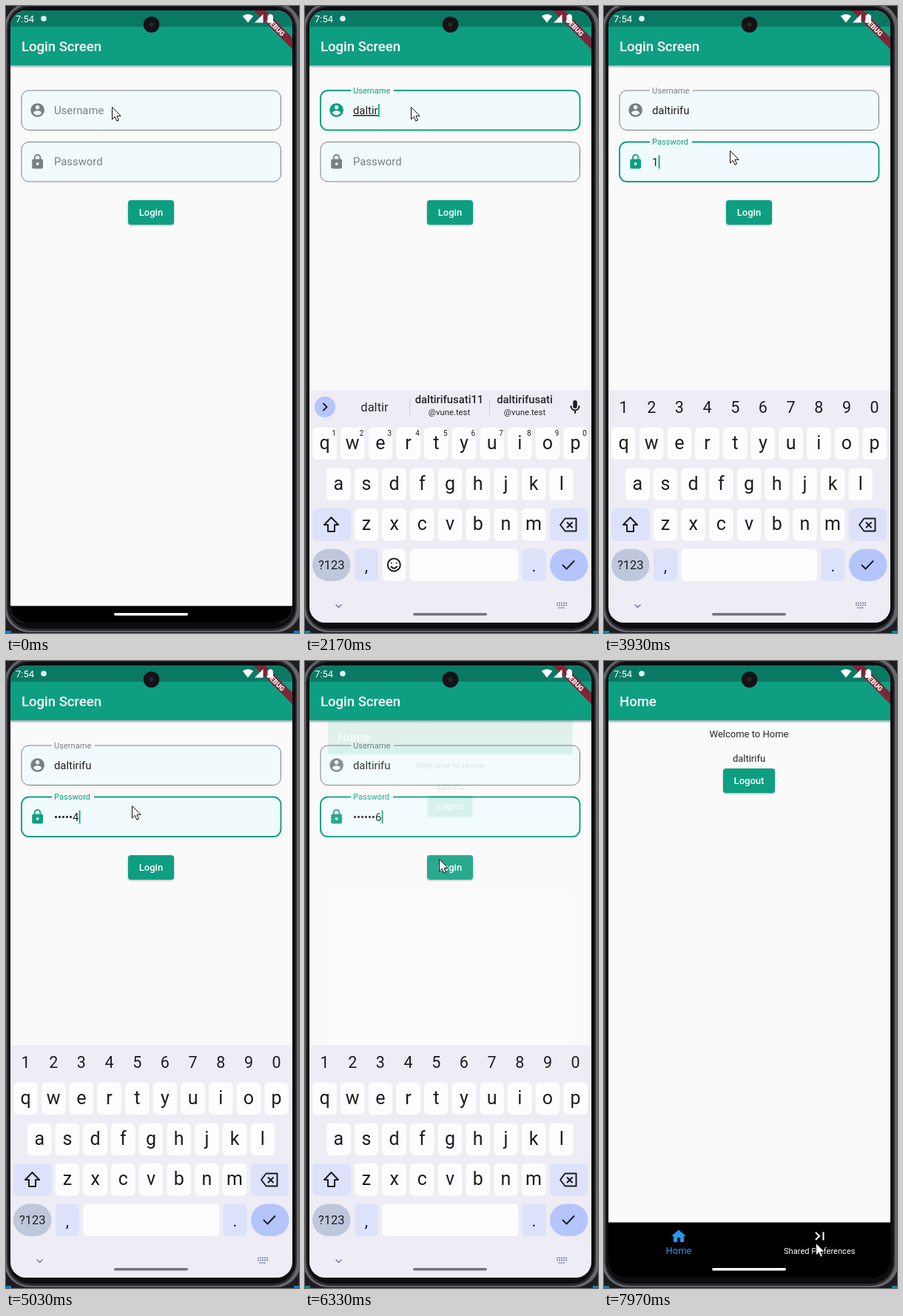
Write an HTML page that moves like this. It is 396 px wide and 846 px high and loops after 8 s.

```html
<!DOCTYPE html>
<html lang="en">
<head>
<meta charset="utf-8">
<title>Login flow</title>
<style>
:root { --teal: #0e9f82; --idle: #788083; --page: #fafafb; --ink: #1d1d21; }
html, body { margin: 0; width: 100%; height: 100%; overflow: hidden; background: #1b1d21; }
svg { display: block; width: 396px; height: 846px; font-family: Roboto, sans-serif; }
.mid { text-anchor: middle; }
.title { font-size: 18.5px; font-weight: 500; fill: #fff; }
.input { font-size: 14.83px; fill: #202022; stroke: none; }
.body { font-size: 13px; fill: #27272a; }
.btn rect { fill: var(--teal); filter: drop-shadow(0 1.5px 1px #0005); }
.btn text { font-size: 13px; font-weight: 500; fill: #fff; text-anchor: middle; }
.field { color: var(--idle); stroke-width: 1px; }
.box { fill: #f1fbfd; stroke: none; }
.border { fill: none; stroke: currentColor; }
.icon { fill: currentColor; stroke: none; }
.line { fill: none; stroke: var(--ink); stroke-width: 2; stroke-linecap: round; stroke-linejoin: round; }
.label { font-size: 14.83px; fill: currentColor; stroke: none; }
.key { fill: #fdfdff; }
.mod { fill: #dce2f9; }
.pill { fill: #bfc7dc; }
.accent { fill: #b4c5fc; }
.glyph { font-size: 25px; fill: var(--ink); text-anchor: middle; }

.field, .label, .gap, #keyboard, .words, .digits, #handle, #home, #pointer {
  animation: 8s linear infinite;
}
#user { animation-name: user-focus; }
#pass { animation-name: pass-focus; }
#user .label { animation-name: user-float; }
#pass .label { animation-name: pass-float; }
.label { animation-timing-function: cubic-bezier(.4, 0, .2, 1); }
#user .gap { animation-name: user-gap; }
#pass .gap { animation-name: pass-gap; }
#keyboard { animation-name: keyboard; }
.words { animation-name: words; }
.digits { animation-name: digits; }
#handle { animation-name: handle; }
#home { animation-name: home; animation-timing-function: cubic-bezier(.2, .6, .2, 1); transform-origin: 196px 419px; }
#pointer { animation-name: pointer; animation-timing-function: cubic-bezier(.4, 0, .3, 1); }

@keyframes user-focus {
  0%, 8% { color: var(--idle); stroke-width: 1px; }
  10%, 41% { color: var(--teal); stroke-width: 1.9px; }
  43%, 100% { color: var(--idle); stroke-width: 1px; }
}
@keyframes pass-focus {
  0%, 41% { color: var(--idle); stroke-width: 1px; }
  43%, 100% { color: var(--teal); stroke-width: 1.9px; }
}
@keyframes user-float {
  0%, 8% { transform: translate(65px, 145.5px); }
  10.1%, 100% { transform: translate(65px, 117.5px) scale(.75); }
}
@keyframes pass-float {
  0%, 41% { transform: translate(65px, 215px); }
  43.1%, 100% { transform: translate(65px, 187px) scale(.75); }
}
@keyframes user-gap { 0%, 8% { opacity: 1; } 9.5%, 100% { opacity: 0; } }
@keyframes pass-gap { 0%, 41% { opacity: 1; } 42.5%, 100% { opacity: 0; } }
@keyframes keyboard {
  0%, 21.5% { transform: translateY(328px); animation-timing-function: cubic-bezier(.1, .7, .2, 1); }
  25%, 79.3% { transform: none; animation-timing-function: ease-in; }
  82.3%, 100% { transform: translateY(328px); }
}
@keyframes words { 0%, 42.5% { opacity: 1; } 42.51%, 100% { opacity: 0; } }
@keyframes digits { 0%, 42.5% { opacity: 0; } 42.51%, 100% { opacity: 1; } }
@keyframes handle {
  0%, 22% { fill: #fdfdfd; }
  24%, 82% { fill: #76757c; }
  88% { fill: #c8c8ca; }
  92%, 100% { fill: #fdfdfd; }
}
@keyframes home {
  0%, 79% { opacity: 0; transform: scale(.85); }
  82.8%, 100% { opacity: 1; transform: none; }
}
@keyframes pointer {
  0%, 32.5% { transform: translate(143px, 136px); }
  37.5%, 38% { transform: translate(175px, 187px); }
  40.5%, 69% { transform: translate(170px, 195px); }
  75.5%, 80.5% { transform: translate(181px, 267px); }
  86.5%, 89.5% { transform: translate(175px, 167px); }
  98%, 100% { transform: translate(286px, 785px); }
}
</style>
</head>
<body>
<svg viewBox="0 0 396 846">
  <defs>
    <clipPath id="screen"><rect x="6" y="6" width="381" height="826" rx="21"/></clipPath>
    <linearGradient id="shade" x2="0" y2="1">
      <stop stop-color="#40504e" stop-opacity=".5"/><stop offset="1" stop-color="#40504e" stop-opacity="0"/>
    </linearGradient>
    <g id="bar">
      <rect x="6" y="6" width="381" height="826" fill="var(--page)"/>
      <rect x="6" y="80" width="381" height="4" fill="url(#shade)"/>
      <rect x="6" y="6" width="381" height="74" fill="var(--teal)"/>
    </g>
  </defs>

  <path d="M0 843h7v3h-7zM389 843h7v3h-7z" fill="#0b86b4"/>
  <rect x="-2" y="-4" width="400" height="849" rx="33" fill="#68686c"/>
  <rect x="1" y="-2" width="392" height="845" rx="32" fill="#2a2a2e"/>
  <rect x="3" y="1" width="388" height="839" rx="30" fill="#0d0d10"/>

  <g clip-path="url(#screen)">
    <use href="#bar"/>
    <text class="title" x="21" y="61">Login Screen</text>

    <g id="user" class="field">
      <rect class="box" x="21" y="114" width="350.5" height="53.5" rx="10"/>
      <path class="border" d="M120 114H361.5a10 10 0 0 1 10 10v33.5a10 10 0 0 1-10 10H31a10 10 0 0 1-10-10V124a10 10 0 0 1 10-10H62"/>
      <path class="border gap" d="M62 114H120"/>
      <path class="icon" transform="translate(31.5 129.4) scale(.927)" d="M12 2C6.48 2 2 6.48 2 12s4.48 10 10 10 10-4.48 10-10S17.52 2 12 2zm0 3c1.66 0 3 1.34 3 3s-1.34 3-3 3-3-1.34-3-3 1.34-3 3-3zm0 14.2c-2.5 0-4.71-1.28-6-3.22.03-1.99 4-3.08 6-3.08 1.99 0 5.97 1.09 6 3.08-1.29 1.94-3.5 3.22-6 3.22z"/>
      <text class="label">Username</text>
      <text id="userText" class="input" x="65" y="146"></text>
    </g>

    <g id="pass" class="field">
      <rect class="box" x="21" y="183.5" width="350.5" height="53.5" rx="10"/>
      <path class="border" d="M119 183.5H361.5a10 10 0 0 1 10 10v33.5a10 10 0 0 1-10 10H31a10 10 0 0 1-10-10V193.5a10 10 0 0 1 10-10H62"/>
      <path class="border gap" d="M62 183.5H119"/>
      <path class="icon" transform="translate(31.5 199) scale(.927)" d="M18 8h-1V6c0-2.76-2.24-5-5-5S7 3.24 7 6v2H6c-1.1 0-2 .9-2 2v10c0 1.1.9 2 2 2h12c1.1 0 2-.9 2-2V10c0-1.1-.9-2-2-2zm-6 9c-1.1 0-2-.9-2-2s.9-2 2-2 2 .9 2 2-.9 2-2 2zm3.1-9H8.9V6c0-1.71 1.39-3.1 3.1-3.1 1.71 0 3.1 1.39 3.1 3.1v2z"/>
      <text class="label">Password</text>
      <text id="passText" class="input" x="65" y="215.5"></text>
    </g>
    <rect id="caret" width="1.8" height="18" fill="var(--teal)"/>

    <g class="btn"><rect x="165" y="262" width="62" height="33" rx="4"/><text x="196" y="283">Login</text></g>
    <rect x="6" y="809.5" width="381" height="23"/>

    <g id="home">
      <use href="#bar"/>
      <text class="title" x="21" y="61">Home</text>
      <text class="body mid" x="196" y="103">Welcome to Home</text>
      <text class="body mid name" x="196" y="136"></text>
      <g class="btn"><rect x="161" y="145" width="70" height="33" rx="4"/><text x="196" y="166">Logout</text></g>
      <rect x="6" y="757.5" width="381" height="75"/>
      <g fill="#2796ee">
        <path d="M99 784v-6h4v6h5v-8h3l-10-8.5-10 8.5h3v8z"/>
        <text class="mid" x="101" y="800" font-size="13">Home</text>
      </g>
      <path d="M286 771l5 5-5 5M296.5 770.5v11" fill="none" stroke="#fff" stroke-width="2"/>
      <text class="mid" x="291.3" y="800" font-size="11.1" fill="#fff">Shared Preferences</text>
    </g>

    <g id="keyboard">
      <rect x="6" y="518" width="381" height="328" fill="#eeecf4"/>
      <g id="keys"></g>
      <g class="words">
        <circle class="accent" cx="27" cy="541" r="14"/>
        <path class="line" d="M25 536.5l4.5 4.5-4.5 4.5"/>
        <path d="M141.5 530v22M249.5 530v22" stroke="#cfcdd6"/>
        <g class="mid" fill="#27272a">
          <text id="guess" x="94" y="546.5" font-size="16.5"></text>
          <g font-size="14.8" font-weight="500">
            <text x="195" y="536">daltirifusati11</text>
            <text x="297" y="536">daltirifusati</text>
          </g>
          <g font-size="11.3">
            <text x="195" y="552">@vune.test</text>
            <text x="297" y="552">@vune.test</text>
          </g>
        </g>
        <rect x="362.3" y="532" width="5.5" height="11" rx="2.7" fill="var(--ink)"/>
        <path class="line" d="M359.5 540a5.5 5.5 0 0 0 11 0M365 546v3"/>
        <rect class="key" x="105" y="732.5" width="31" height="43.5" rx="6"/>
        <rect class="key" x="142" y="732.5" width="146" height="43.5" rx="6"/>
        <circle class="line" cx="120.3" cy="754" r="8.5"/>
        <path class="line" d="M117 751.5v.1M123.6 751.5v.1M116.5 756.5q3.8 4.5 7.6 0"/>
      </g>
      <g class="digits"><rect class="key" x="104.5" y="732.5" width="183.5" height="43.5" rx="6"/></g>
      <path class="line" d="M35.5 690l9.5 10h-5v9h-9v-9h-5z"/>
      <path class="line" d="M351.5 691.5h15v17h-15l-6.5-8.5zM354.5 697l6.5 6.5M361 697l-6.5 6.5"/>
      <path class="line" d="M348.5 754.5l5 5 10-10.5"/>
      <g fill="none" stroke="#71779a">
        <path d="M41.5 807.5l4 4 4-4" stroke-width="1.4"/>
        <path d="M340 805.5h14M340 808.5h14M342.5 812h9" stroke-width="1.7" stroke-dasharray="2 1"/>
      </g>
    </g>
    <rect id="handle" x="146" y="819" width="100" height="3.5" rx="1.75"/>

    <rect x="6" y="6" width="381" height="22" fill="#0a7964"/>
    <g transform="translate(387 6) rotate(45)">
      <rect x="-40" y="26" width="80" height="11" fill="#7d2638"/>
      <text class="mid" y="35" font-size="9.4" font-weight="900" fill="#fff">DEBUG</text>
    </g>
    <text x="13" y="22" font-size="13" fill="#fff">7:54</text>
    <circle cx="51" cy="17" r="3.8" fill="#d9f2ee"/>
    <g fill="#fff">
      <path d="M327 22.5l-7.2-9q7.2-5 14.4 0z"/>
      <path d="M336 22.5h11.5V11z"/>
      <path d="M353.5 12.5h2V11h3.500v1.5h2v10h-7.5z"/>
    </g>
  </g>
  <circle cx="196.5" cy="25" r="10.8" fill="#131316"/>
  <circle cx="196.5" cy="25" r="3" fill="#28282e"/>

  <path id="pointer" d="M.5.5v16.5l3.8-3.7 2.5 5.9 2.6-1.1-2.5-5.8h5.2z" fill="#fff" stroke="#101012"/>
</svg>

<script>
const $ = id => document.getElementById(id);
const LOOP = 8000;
const NAME = 'daltirifu', SECRET = '1321546';
const USER_FOCUS = 640, PASS_FOCUS = 3280;
const nameTimes = [...NAME].map((_, i) => 1560 + i * 115);
const secretTimes = [...SECRET].map((_, i) => 3850 + i * 225);

// Keyboard layout
const PITCH = 37.68;
const rect = (cls, x, y, w, rx = 6) =>
  `<rect class="${cls}" x="${x}" y="${y}" width="${w}" height="43.5" rx="${rx}"/>`;
const label = (text, x, y, size = 25, cls = '') =>
  `<g class="${cls}"><text class="glyph" x="${x}" y="${y}" style="font-size:${size}px">${text}</text></g>`;

let keys = '';
[['qwertyuiop', 26.5, 568.5], ['asdfghjkl', 45.3, 623.5], ['zxcvbnm', 83, 678]].forEach(([row, x0, y]) => {
  [...row].forEach((ch, i) => {
    const x = x0 + i * PITCH;
    keys += rect('key', x - 16.3, y, 32.6) + label(ch, x, y + 29);
  });
});
for (let i = 0; i < 10; i++) {
  const x = 26.5 + i * PITCH, n = (i + 1) % 10;
  keys += label(n, x + 12.5, 580, 10, 'words') + label(n, x, 548.5, 21.5, 'digits');
}
keys += rect('mod', 10, 678, 52) + rect('mod', 331, 678, 51)
  + rect('mod', 67, 732.5, 32) + rect('mod', 293.5, 732.5, 32)
  + rect('pill', 10, 732.5, 51.5, 21.7) + rect('accent', 331, 732.5, 51.5, 21.7)
  + label('?123', 35.7, 760, 16.5) + label(',', 83, 763, 22) + label('.', 309.5, 763, 22);
$('keys').innerHTML = keys;
document.querySelector('.name').textContent = NAME;

const typedCount = (times, t) => times.filter(at => at <= t).length;

function render(t) {
  const nameLen = typedCount(nameTimes, t);
  const secretLen = typedCount(secretTimes, t);
  const onPass = t >= PASS_FOCUS;

  $('userText').textContent = $('guess').textContent = NAME.slice(0, nameLen);
  $('userText').style.textDecoration = t > 1750 && !onPass ? 'underline' : 'none';

  // The newest character stays readable for a moment
  const shown = secretLen && t - secretTimes[secretLen - 1] < 1500 ? 1 : 0;
  $('passText').textContent = '•'.repeat(secretLen - shown) + SECRET.slice(secretLen - shown, secretLen);

  const field = onPass ? $('passText') : $('userText');
  const lastInput = Math.max(...[USER_FOCUS, PASS_FOCUS, ...nameTimes, ...secretTimes].filter(at => at <= t));
  const blinkOn = t >= USER_FOCUS && (t - lastInput) % 1000 < 500;
  $('caret').setAttribute('x', 65.3 + (field.textContent ? field.getComputedTextLength() : 0));
  $('caret').setAttribute('y', onPass ? 201.5 : 132);
  $('caret').style.opacity = blinkOn ? 1 : 0;
}

let start;
function tick(now) {
  start ??= now;
  render((now - start) % LOOP);
  requestAnimationFrame(tick);
}
requestAnimationFrame(tick);
</script>
</body>
</html>
```
